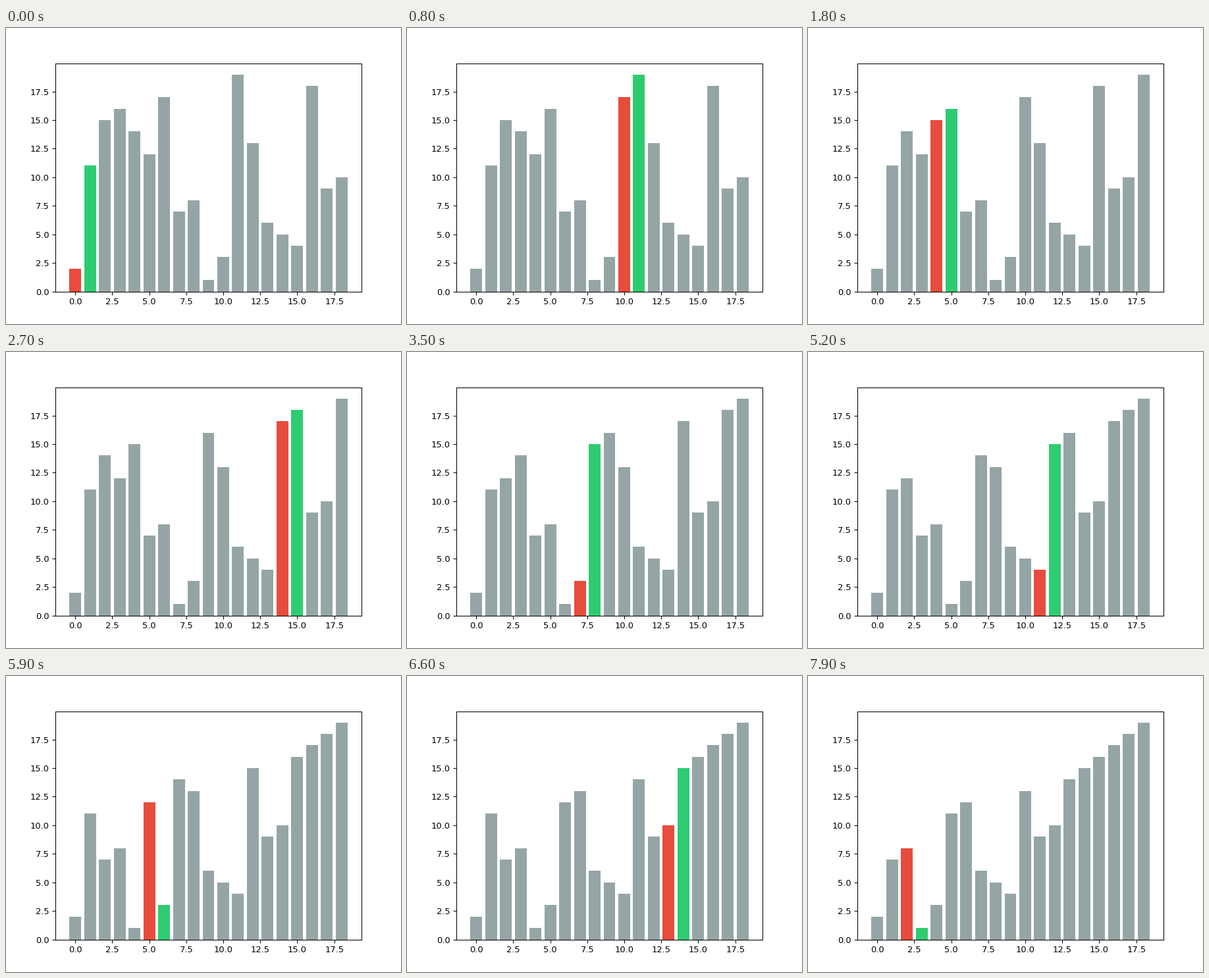
A matplotlib script that plays this animation: 600x450 px, repeating every 8 s.

```python
import matplotlib.pyplot as plt
from matplotlib.animation import FuncAnimation

GREY, RED, GREEN = "#95a5a6", "#e74c3c", "#2ecc71"
VALUES = [2, 11, 15, 16, 14, 12, 17, 7, 8, 1, 3, 19, 13, 6, 5, 4, 18, 9, 10]
FRAMES, INTERVAL = 80, 100
STEPS_PER_SECOND = 24


def bubble_steps(values):
    """List (heights, index) before and after every comparison."""
    a = list(values)
    steps = []
    for end in range(len(a) - 1, 0, -1):
        for j in range(end):
            steps.append((a[:], j))
            if a[j] > a[j + 1]:
                a[j], a[j + 1] = a[j + 1], a[j]
            steps.append((a[:], j))
    return steps


STEPS = bubble_steps(VALUES)

fig, ax = plt.subplots(figsize=(6.4, 4.8), dpi=93.75)
bars = ax.bar(range(len(VALUES)), VALUES, color=GREY)


def update(frame):
    step = 1 + frame * INTERVAL * STEPS_PER_SECOND // 1000
    heights, j = STEPS[step]
    for i, (bar, height) in enumerate(zip(bars, heights)):
        bar.set_height(height)
        bar.set_facecolor({j: RED, j + 1: GREEN}.get(i, GREY))
    return list(bars)


anim = FuncAnimation(fig, update, frames=FRAMES, interval=INTERVAL,
                     repeat=True, repeat_delay=0)
plt.show()
```
